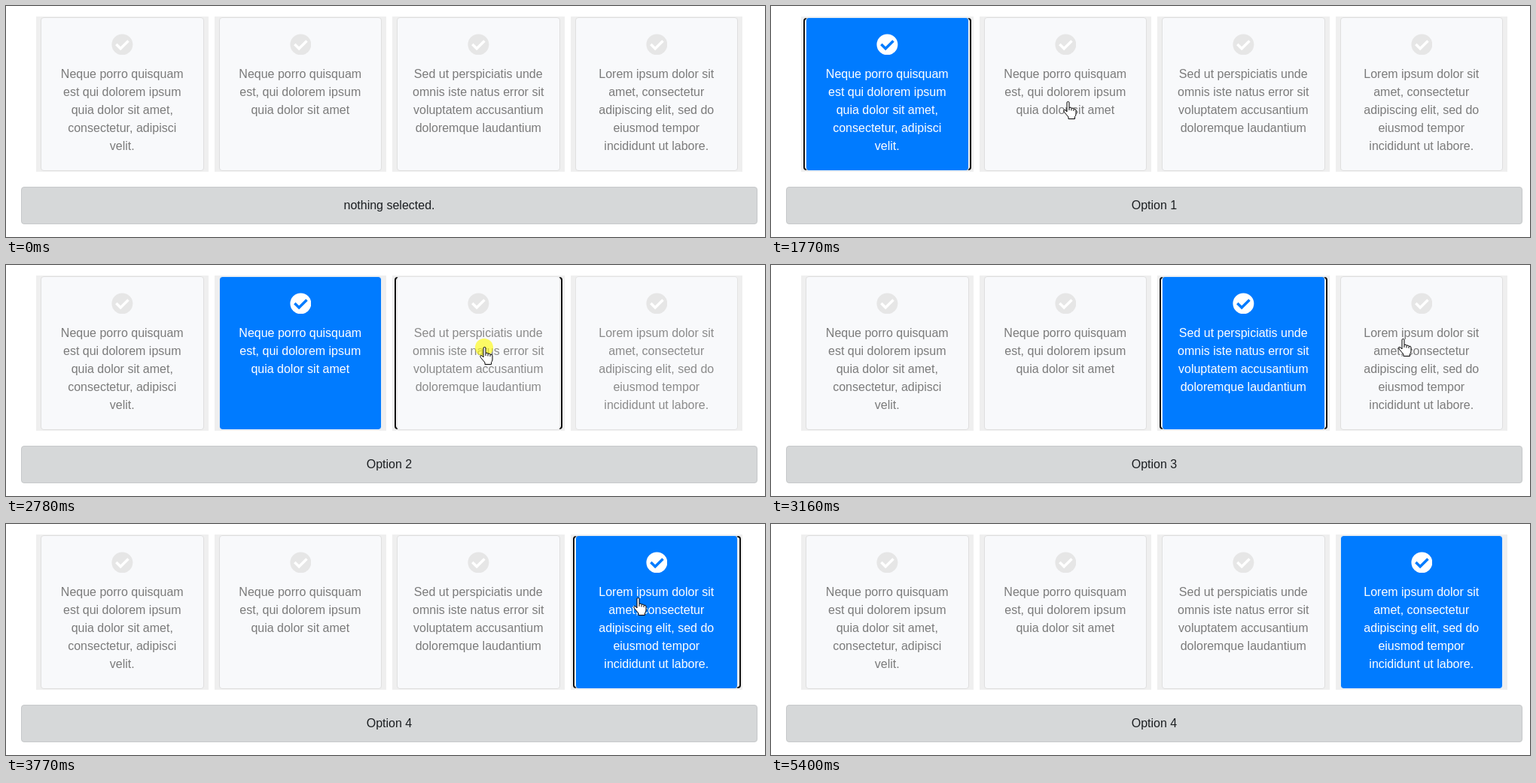
An HTML page for the animation above (5.47 s loop, 1008x308 px).

```html
<!DOCTYPE html>
<html lang="en">
<head>
<meta charset="utf-8">
<title>Option cards</title>
<style>
  html, body { margin: 0; width: 100%; height: 100%; overflow: hidden; background: #fff; }
  body { position: relative; font: 16px/24px "Liberation Sans", Arial, sans-serif; }
  .option, .ring, .card, .status, .glow, .cursor { position: absolute; box-sizing: border-box; }
  .option { top: 14px; width: 228.5px; height: 207px; background: #efefef; }
  .ring {
    left: 3px; top: 2px; width: 223px; height: 203px;
    border: 2px solid #101010; border-radius: 4px;
    box-shadow: inset 0 0 0 1px #fff; visibility: hidden;
  }
  .card {
    left: 6px; top: 1px; width: 216.5px; height: 205px; padding-top: 63px;
    border: 1px solid #dfdfdf; border-radius: 4px;
    background: #f8f9fb; color: #7b7b7b; text-align: center; white-space: pre;
  }
  .icon { position: absolute; left: 93px; top: 20.6px; width: 28.8px; height: 28.8px; }
  .icon circle { fill: #e6e6e6; }
  .icon path { fill: none; stroke: #fff; stroke-width: 62; }
  .focused .ring { visibility: visible; }
  .soft .card { color: #8b8b8b; border-color: #e4e4e4; }
  .selected .card { background: #007bff; background-clip: padding-box; border-color: #e3edf7; color: #fff; }
  .selected .icon circle { fill: #fff; }
  .selected .icon path { stroke: #007bff; }
  .status {
    left: 20px; top: 241px; width: 978px; height: 50px; padding: 12px 0;
    border: 1px solid #c6c8ca; border-radius: 4px;
    background: #d6d8d9; color: #1b1e21; text-align: center;
  }
  .glow { left: 0; top: 0; width: 24px; height: 24px; border-radius: 50%; background: rgba(255, 250, 0, .6); }
  .cursor { left: 0; top: 0; width: 18px; height: 24px; overflow: visible; }
  .cursor path { fill: #fff; stroke: #000; stroke-linejoin: round; }
</style>
</head>
<body>
<div class="status"></div>
<div class="glow"></div>
<svg class="cursor" viewBox="0 0 18 24">
  <g class="hand">
    <path d="M5 14V2Q5 .5 6.5 .5T8 2V8.5Q10.6 7.300 11 9.300Q13.500 8.300 14 10.300Q17 9.600 17 12V17Q17 19.500 15.500 20.500V23.500H7V21L1.500 14.500Q.2 12.500 1.500 11.500Q3 11 5 14Z"/>
    <path d="M8 8.500V12M11 9.500V12.500M14 10.500V13" style="fill:none"/>
  </g>
  <path class="arrow" d="M.5 .5V16.500L4.200 13L6.700 18.500L9 17.500L6.600 12H11.800Z"/>
</svg>
<script>
const LOOP = 5470;
const texts = [
  "Neque porro quisquam\nest qui dolorem ipsum\nquia dolor sit amet,\nconsectetur, adipisci\nvelit.",
  "Neque porro quisquam\nest, qui dolorem ipsum\nquia dolor sit amet",
  "Sed ut perspiciatis unde\nomnis iste natus error sit\nvoluptatem accusantium\ndoloremque laudantium",
  "Lorem ipsum dolor sit\namet, consectetur\nadipiscing elit, sed do\neiusmod tempor\nincididunt ut labore."
];
const pressTimes = [840, 2000, 2780, 3620];
const selectTimes = [990, 2150, 2930, 3770];
const BLUR_TIME = 5400;
const FRAME = 77;

const easeOut = p => p * (2 - p);
const smooth = p => p * p * (3 - 2 * p);
const easeIn = p => p * p;
// Pointer moves in held steps; "lead" counts the step already taken at the start.
const moves = [
  { at: 130, steps: 5, lead: 0, from: [695, 277], to: [180, 107], ease: easeOut },
  { at: 1540, steps: 4, lead: 1, from: [180, 107], to: [388, 127], ease: smooth },
  { at: 2230, steps: 4, lead: 1, from: [388, 127], to: [629, 109], ease: smooth },
  { at: 3010, steps: 3, lead: 1, from: [629, 109], to: [833, 98], ease: smooth },
  { at: 4480, steps: 3, lead: 1, from: [833, 98], to: [902, 291], ease: easeIn, end: 4700 }
];

const find = selector => document.querySelector(selector);
const status = find(".status"), glow = find(".glow"), cursor = find(".cursor");
const hand = find(".hand"), arrow = find(".arrow");
const show = (el, on) => { el.style.visibility = on ? "visible" : "hidden"; };
const place = (el, x, y) => { el.style.transform = `translate(${x}px, ${y}px)`; };
const lastStarted = (times, t) => times.filter(time => time <= t).length - 1;

const options = texts.map((text, i) => {
  const option = document.createElement("div");
  option.className = "option";
  option.style.left = 40 + 236.5 * i + "px";
  option.innerHTML = `<div class="ring"></div><div class="card"><svg class="icon" viewBox="0 0 512 512">
    <circle cx="256" cy="256" r="248"/><path d="M113 250L216 353L400 169"/></svg>${text}</div>`;
  document.body.insertBefore(option, status);
  return option;
});

function pointerAt(t) {
  const move = moves[lastStarted(moves.map(m => m.at), t)];
  if (!move || t >= move.end) return null;
  const step = Math.floor((t - move.at + 5) / FRAME) + move.lead;
  const p = move.ease(Math.min(1, step / move.steps));
  return move.from.map((start, i) => Math.round(start + (move.to[i] - start) * p));
}

function render(t) {
  const pressed = lastStarted(pressTimes, t);
  const selected = lastStarted(selectTimes, t);
  const pressing = pressed > selected;
  options.forEach((option, i) => {
    option.classList.toggle("focused", i === pressed && t < BLUR_TIME);
    option.classList.toggle("selected", i === selected);
    option.classList.toggle("soft", pressing && i >= pressed);
  });
  const label = selected < 0 ? "nothing selected." : `Option ${selected + 1}`;
  if (status.textContent !== label) status.textContent = label;

  const point = pointerAt(t);
  const overCards = point && point[1] < 221;
  show(hand, overCards);
  show(arrow, point && !overCards);
  show(glow, pressing && t < pressTimes[pressed] + 70);
  if (point) {
    place(cursor, ...point);
    place(glow, point[0] - 6, point[1] - 11);
  }
}

const begin = performance.now();
function tick() {
  render((performance.now() - begin) % LOOP);
  requestAnimationFrame(tick);
}
tick();
</script>
</body>
</html>
```
